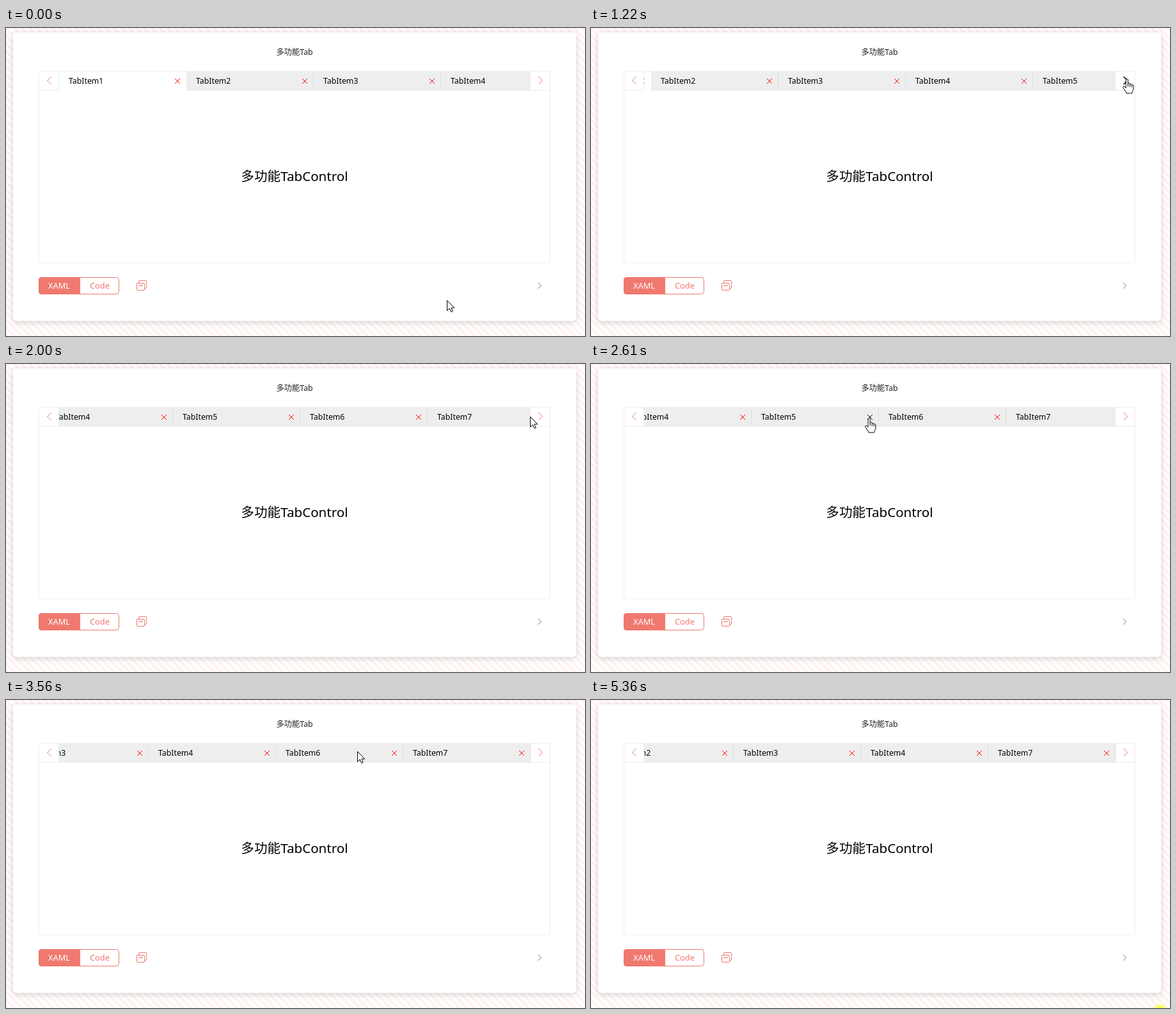
These frames come from a looping animation (905 px wide and 481 px high, 5420 ms). An HTML page:

```html
<!DOCTYPE html>
<html lang="zh">
<head>
<meta charset="utf-8">
<title>Tab</title>
<style>
  html, body { margin: 0; width: 100%; height: 100%; overflow: hidden; background: #fff; }
  svg { display: block; width: 100vw; height: 100vh; }
  text { font-family: "Noto Sans", "Noto Sans CJK SC", "Noto Sans CJK", sans-serif; font-size: 12.3px; }
  .han { font-family: "Noto Sans CJK SC", "Noto Sans CJK", sans-serif; font-weight: 300; }
  .card { filter: drop-shadow(0 2px 5px rgba(60, 50, 60, .22)); }
  .line { fill: none; stroke: #eee; }
  .icon { fill: none; stroke: #ef796f; }
  .cross { fill: none; stroke-width: .95; }
  .pointer { fill: #fff; stroke: #000; stroke-linejoin: round; }
</style>
</head>
<body>
<svg viewBox="0 0 905 481">
  <defs>
    <pattern id="stripes" width="12" height="12" patternUnits="userSpaceOnUse">
      <path d="M-3 -3L15 15M-3 9L3 15M9 -3L15 3" stroke="#fff3f2" stroke-width="4.500"/>
    </pattern>
    <clipPath id="strip"><rect x="82" y="67" width="738" height="31"/></clipPath>
  </defs>

  <rect width="905" height="481" fill="#fff"/>
  <rect width="905" height="481" fill="url(#stripes)"/>
  <circle id="glow" cx="889" cy="487.500" r="12" fill="#ffff6e"/>
  <rect class="card" x="11" y="7" width="880" height="450.500" rx="5" fill="#fff"/>

  <text x="451" y="42" text-anchor="middle" fill="#212121"><tspan class="han">多功能</tspan>Tab</text>
  <text x="451" y="239" text-anchor="middle" style="font-size:20.6px"><tspan class="han">多功能</tspan>TabControl</text>

  <g clip-path="url(#strip)" id="tabs"></g>
  <path class="line" d="M51.500 67.500H850.500V366.500H51.500ZM52 97.500H82.500V68M820 97.500H850"/>
  <path class="icon" d="M70.500 76L64.500 82L70.500 88"/>
  <path class="icon" id="next" d="M832.500 76L838.500 82L832.500 88"/>

  <rect x="51.500" y="389.500" width="125" height="26" rx="4" fill="#fff" stroke="#ef796f"/>
  <path d="M116 389H55.500a4.500 4.500 0 0 0-4.500 4.500V411.500a4.500 4.500 0 0 0 4.500 4.500H116Z" fill="#ef796f"/>
  <text x="83" y="407" text-anchor="middle" style="font-size:12.8px" fill="#fff">XAML</text>
  <text x="146.500" y="407" text-anchor="middle" style="font-size:12.8px" fill="#ef796f">Code</text>
  <g class="icon">
    <path d="M207.500 398V396a1.500 1.500 0 0 1 1.500-1.500H218a1.500 1.500 0 0 1 1.500 1.500V405a1.500 1.500 0 0 1-1.500 1.500H216.500"/>
    <rect x="204.500" y="398.500" width="12" height="11" rx="1.500"/>
    <path d="M207 402.500H214"/>
  </g>
  <path d="M831.500 397.500L836.500 402.200L831.500 407" fill="none" stroke="#858585"/>

  <path class="pointer" id="arrow" d="M.5 .5V16.500L4.200 13L6.800 18.500L9.200 17.400L6.800 12H11.800Z"/>
  <path class="pointer" id="hand" d="M-.9 14.500V2a1.600 1.600 0 0 1 3.200 0V8.500
    a1.500 1.500 0 0 1 3 .2V9.500a1.500 1.500 0 0 1 2.900 .2V10.500a1.400 1.400 0 0 1 2.700 .3
    V16C10.900 18 9.500 19.500 9 21.500L8.500 23H0C-.3 20.500-3 18-5.200 14.500
    C-6.200 12.700-4.200 11.600-3 12.700ZM2.300 8.500V12.500M5.300 9.500V13M8.200 10.500V13.500"/>
</svg>
<script>
const LOOP = 5420, STEP = 77;
const TAB = 199, PAGE = 314;
const $ = id => document.getElementById(id);
const clamp = v => Math.max(0, Math.min(1, v));
const easeOut = (k, start, length) => 1 - (1 - clamp((k - start) / length)) ** 3;
const within = (k, a, b) => k >= a && k <= b;
const show = (el, on) => el.style.display = on ? '' : 'none';

// Pointer path: step, x, y
const path = [
  [0, 689, 425], [2, 560, 350], [4, 403, 225], [6, 610, 135], [8, 802, 98],
  [9, 837, 93], [11, 833, 81], [12, 837, 79], [25, 837, 79], [27, 800, 85],
  [29, 711, 91], [32, 500, 86], [34, 434, 84], [35, 434, 84], [36, 435, 84],
  [38, 435, 84], [43, 496, 80], [44, 496, 80], [46, 549, 80], [49, 600, 81],
  [50, 600, 81], [52, 595, 71], [54, 608, 83], [55, 608, 83], [57, 630, 124],
  [61, 862, 448]
];
const CLOSE_5 = 37.05, CLOSE_6 = 55.05, SLIDE = 2.96, EXIT = 62;

function pointerAt(k) {
  const i = path.findIndex(p => p[0] >= k);
  if (i < 1) return path[i < 0 ? path.length - 1 : 0].slice(1);
  const a = path[i - 1], b = path[i], u = (k - a[0]) / (b[0] - a[0]);
  return [1, 2].map(n => Math.round(a[n] + (b[n] - a[n]) * u));
}

const tabs = Array.from({ length: 7 }, (_, i) => {
  const g = document.createElementNS('http://www.w3.org/2000/svg', 'g');
  g.innerHTML =
    `<rect y="68" width="${TAB}" height="30" fill="${i ? '#eee' : '#fff'}"/>` +
    (i ? `<rect x="${TAB - 1}" y="68" width="1" height="30" fill="#e0e0e0"/>` : '') +
    `<text x="15" y="87">TabItem${i + 1}</text>` +
    `<path class="cross" d="M181 79L189 87M189 79L181 87"/>`;
  $('tabs').append(g);
  return { g, cross: g.querySelector('.cross') };
});

function scrollAt(k) {
  const paged = PAGE * (easeOut(k, 13.3, 6.5) + easeOut(k, 19.87, 9));
  const count = 7 - (k > CLOSE_5) - (k > CLOSE_6);
  return Math.min(paged, count * TAB - 737);
}

function draw(t) {
  const k = Math.floor((t + 9) / STEP);
  const scroll = scrollAt(k);
  tabs.forEach(({ g, cross }, i) => {
    let slot = i;
    if (i > 4) slot -= easeOut(k, CLOSE_5, SLIDE);
    if (i > 5) slot -= easeOut(k, CLOSE_6, SLIDE);
    g.setAttribute('transform', `translate(${Math.round(83 + slot * TAB - scroll)})`);
    show(g, !(i === 4 && k > CLOSE_5) && !(i === 5 && k > CLOSE_6));
    const hot = i === 4 && within(k, 34, 37) || i === 5 && within(k, 49, 55);
    cross.setAttribute('stroke', hot ? '#000' : '#f00');
  });

  const onNext = within(k, 9, 25);
  $('next').style.stroke = onNext ? '#000' : '';
  $('next').style.strokeWidth = onNext ? 1.6 : '';

  const [x, y] = pointerAt(k);
  const isHand = onNext || within(k, 34, 38) || within(k, 49, 55);
  for (const id of ['arrow', 'hand']) {
    $(id).setAttribute('transform', `translate(${x} ${y})`);
    show($(id), k < EXIT && isHand === (id === 'hand'));
  }
  show($('glow'), k >= 69);
}

const begin = performance.now();
function tick() {
  draw((performance.now() - begin) % LOOP);
  requestAnimationFrame(tick);
}
tick();
</script>
</body>
</html>
```
